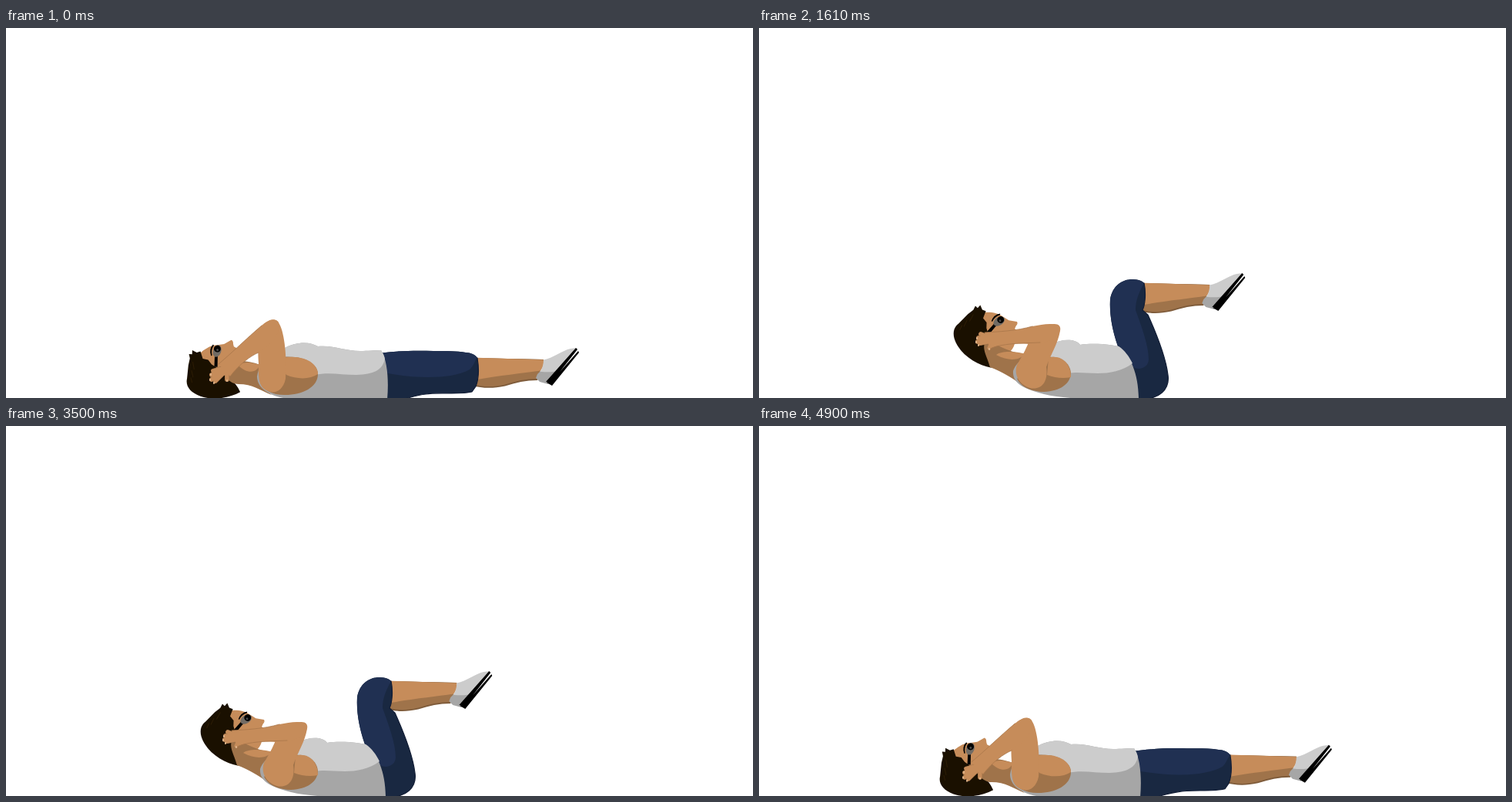
Animation, 970 px wide and 480 px high, one loop 4970 ms. Source, as an HTML page:

```html
<!DOCTYPE html>
<html lang="en">
<head>
<meta charset="utf-8">
<title>Crunch</title>
<style>
  html, body { margin: 0; width: 100%; height: 100%; overflow: hidden; background: #fff; }
  svg { display: block; width: 970px; height: 480px; }
</style>
</head>
<body>
<svg id="stage" viewBox="0 0 970 480">
  <g id="shin">
    <path fill="#7f5c3b" d="M604 428L698 430 690 457C675 457 662 460 648 464.500C630 468.500 617 467 606 464Z"/>
    <path fill="#9f734a" d="M604 428L698 430 690 455C675 455 662 458 648 462.500C630 467 617 465 606 462Z"/>
    <path fill="#c68c5a" d="M604 427.500L698 430.500C699 436 697 441 694 444.500C670 448 640 451 612 456L604 455Z"/>
    <path fill="#a6a6a6" d="M696 443L690 449 688 454 693 459 704 462 719 442Z"/>
    <path fill="#ccc" d="M698 430.500C711 428 723 418 733 416L741 415 716 445C708 447 700 446 694 446Q698 438 698 430.500Z"/>
    <path d="M740 415L742 417 708 460 701 459ZM743 419L744 421 709 464 702 460 712 454Z"/>
  </g>
  <g id="legs"></g>
  <g id="head">
    <path fill="#c68c5a" d="M338 345L354 331C362 335 370 342 372 349L376 357 384 364Q384 367 380 368L377 370 376 376 370 383Q364 390 357 392L344 388 328 374Z"/>
    <path fill="#1a1000" d="M324 397C312 386 302 368 302 350C302 336 308 327 318 326L335 322 344 321 349 318 350 322 355 320.500 354 327 357 331 349 337 350 344 346 350 344 357 338 364C338 374 336 386 324 397Z"/>
    <path fill="none" stroke="#2d1d05" d="M315 334L321 330M322 333L330 328M332 331L341 326"/>
    <path d="M356 346Q363 340 371 343.500L370 345Q363 343 357 347ZM344 354.500L359 350V354L345 358.500Z"/>
    <ellipse cx="364.500" cy="351.300" rx="8" ry="5.200" fill="#716b64"/>
    <ellipse cx="367.300" cy="350.600" rx="4.400" ry="4.500"/>
    <circle cx="366" cy="351.300" r="1.500" fill="#484848"/>
  </g>
  <g id="trunk"></g>
</svg>
<script>
const SKIN = '#c68c5a', SHADE = '#9f734a';
const STEP = 70, LOOP = 4970, PEAK = 34;
const HIP = { x: 503.7, y: 439.9, r: 109, rest: 6.3 };

// Progress keys: [step, value]. Thigh in degrees, trunk in pose units.
const THIGH = [[0, 0], [1, .6], [4, 4], [8, 13.9], [10, 22.7], [13, 44.9], [16, 64.2],
  [18, 73], [21, 86], [24, 93], [26, 94.8], [31, 95.4], [34, 95.4]];
const TRUNK = [[0, 0], [1, .01], [4, .1], [8, .36], [10, .56], [13, 1], [16, 1.35],
  [18, 1.6], [21, 2], [24, 2.2], [26, 2.4], [31, 3], [32, 3.06], [34, 3.1]];
const BEND = [0, 44.9, 86, 95.4];
const HEAD = [[274, 418.5, -71], [294, 395, -47], [312, 380, -32], [365, 351, 0]];

// Each shape is listed in four poses: lying, rising, half up, up.
const shortsTop = [
  'M485 422C505 419 530 418 555 419C570 419 585 419 597 421C603 421 610 424 612 428',
  'M484 423C505 398 520 380 536 362C545 353 553 350 560 350C566 351 570 352 571 355',
  'M466 413C458 390 455 370 456 352C459 334 472 326 485 326C493 326 499 329 500 331',
  'M457 414C445 395 438 378 438 360C438 342 450 330 466 330C474 330 480 333 482 335'];
const cuff = [
  'C614 440 614 455 610 465L605 472C590 476 560 472 545 475C535 476 525 479 515 482',
  'C576 368 575 380 572 391L571 399C553 418 541 440 533 462C527 476 516 481 505 481',
  'C503 345 501 360 498 366L505 372C514 392 528 425 531 450C534 470 518 481 500 481',
  'C485 350 483 364 480 370L487 375C500 392 520 420 527 445C532 468 512 481 490 481'];
const seat = ['L485 482Z', 'L485 481Z', 'L485 481Z', 'L470 481Z'];
const shortsLight = [
  'C608 432 608 438 602 443C590 450 570 453 548 453C525 453 505 450 485 446Z',
  'C571 372 566 385 558 394C545 408 528 424 518 433C510 440 500 442 488 443Z',
  'C494 342 489 352 489 366C497 388 506 412 506 430C506 440 494 445 486 440Z',
  'C474 345 470 358 470 372C484 388 496 410 496 428C496 440 486 444 474 438Z'];
const vestTop = [
  'M360 416C378 406 395 407 405 413C425 411 440 419 460 419C470 419 480 418 487 418',
  'M370 412C385 405 402 405 414 413C430 413 450 415 465 417C472 417 480 418 487 418',
  'M380 410C392 404 410 402 417 411C430 409 445 410 455 411C460 412 463 412 467 413',
  'M400 412C412 408 420 405 431 405C438 406 442 409 447 411C453 413 457 413 459 415'];
const vestBack = [
  'C496 432 497 460 495 482C440 482 400 482 360 480C340 476 326 466 326 452C330 430 345 420 360 416Z',
  'C496 432 497 460 494 482C440 482 400 483 366 479C345 474 329 466 329 450C332 432 350 420 370 412Z',
  'C483 425 493 450 493 482C440 482 400 482 370 475C345 468 329 462 330 445C335 430 355 420 380 410Z',
  'C476 425 488 450 488 482C455 481 415 478 388 469C360 458 345 442 341 427C345 412 370 410 400 412Z'];
const vestLight = [
  'C490 422 492 427 492 430C488 444 478 449 455 450C435 450 420 446 400 450L355 440Z',
  'C490 422 491 427 491 430C487 443 477 448 455 448C435 448 420 446 400 449L362 440Z',
  'C475 418 481 427 485 435C472 445 455 448 440 448C425 448 415 446 400 448L365 440Z',
  'C467 420 474 428 478 435C470 443 455 446 440 446C425 445 415 443 402 446L385 430Z'];
const neck = [
  'M285 435C300 430 315 432 330 437C330 450 330 462 345 476C330 470 320 462 302 462C290 462 280 450 285 435Z',
  'M285 425C300 418 312 428 338 430C340 440 335 455 345 472C330 468 318 458 297 456C285 445 280 435 285 425Z',
  'M295 405C310 410 320 420 346 423C340 430 335 440 340 462C325 452 318 447 300 440C296 425 288 415 295 405Z',
  'M328 368C345 380 355 392 362 403C355 412 345 415 342 428C336 415 333 405 324 396C327 385 327 375 328 368Z'];
const throat = [
  'M301 437C310 432 320 434 329 437C328 445 315 452 301 437Z',
  'M303 434C312 428 330 429 337 430C334 438 320 442 303 434Z',
  'M308 424C316 418 335 420 346 423C338 431 325 433 308 424Z',
  'M344 388C350 390 357 394 364 404C356 405 348 398 344 388Z'];
const shoulder = [
  'M350 428C385 422 405 435 405 449C405 466 385 476 362 476C345 476 335 470 330 460Z',
  'M372 428C390 425 405 435 405 448C403 466 385 475 362 475C348 474 338 468 333 458Z',
  'M376 427C392 425 405 435 405 449C403 464 388 472 366 472C350 470 340 465 335 455Z',
  'M395 425C405 427 407 437 407 444C405 455 393 460 378 460C362 455 350 448 347 440Z'];
const deltoid = [
  'M350 430C385 420 405 435 405 449C395 456 378 456 364 450Z',
  'M369 430C388 422 405 435 405 448C394 456 380 454 372 445Z',
  'M376 428C392 423 405 435 405 453C395 455 384 454 374 450Z',
  'M404 427C407 432 407 440 406 447C400 449 394 446 392 438Z'];
const upperArm = [
  'M335 384C343 377 351 376 355 384C362 396 365 430 363 455C360 470 350 474 343 472C330 468 327 460 328 435C327 420 327 410 330 400Z',
  'M360 384C370 381 378 382 377 390C379 405 373 420 370 440C371 462 358 474 347 471C333 468 329 455 334 440C338 425 345 415 352 404Z',
  'M375 386C385 382 393 384 391 393C388 410 378 425 373 440C376 460 366 470 352 467C336 462 331 448 335 437C342 425 346 418 350 408Z',
  'M415 374C432 375 440 381 438 387C432 402 415 417 402 428C395 442 375 450 360 447C345 440 344 428 347 417C358 411 372 407 392 396Z'];
const forearm = [
  'M276 436C295 420 312 403 332 386C339 380 349 375 354 382C357 400 342 412 328 421C318 425 303 436 291 452Z',
  'M284 413C300 409 325 401 350 389C362 383 375 380 377 387C377 402 362 408 345 412C325 416 308 424 294 430Z',
  'M293 395C310 394 335 393 355 387C370 384 388 381 391 390C389 404 375 409 352 410C330 409 315 409 300 416Z',
  'M340 358C355 362 370 367 385 368C405 371 432 372 438 384C436 394 420 396 404 395C385 391 365 384 345 380Z'];
const crease = [
  'M276 436C295 420 312 403 332 386M328 421C318 425 303 436 291 452',
  'M284 413C300 409 325 401 350 389M352 410C330 415 308 424 294 430',
  'M293 395C310 394 335 393 355 387M365 408C340 409 315 409 300 416',
  'M340 358C355 362 370 367 385 368M408 395C385 391 365 384 345 380'];
const fingers = [
  'M283 441L269 445M283 443L267 450M283 445L267 456M284 446L272 458M287 446L287 456',
  'M289 419L278 417M288 420L274 422M288 422L274 427M288 424L277 429M292 424L291 431',
  'M298 401L288 397M297 403L285 402M297 405L284 407M298 407L287 409M302 408L299 415',
  'M342 364L334 358M341 366L331 362M341 368L331 366M342 370L334 369M347 371L341 377'];
const nails = [
  'M266 449V450M265 456V457M270 460V461M287 457V458',
  'M272 422V423M272 428V429M276 431V432M291 432V433',
  'M283 402V403M282 407V408M285 411V412M299 416V417',
  'M329 362V363M329 367V368M332 370V371M340 378V379'];

const byId = id => document.getElementById(id);
const mix = (a, b, f) => a + (b - a) * f;
const NUM = /\d+/g;

function keyed(keys, k) {
  const i = Math.max(1, keys.findIndex(p => p[0] >= k));
  const [a, va] = keys[i - 1], [b, vb] = keys[i];
  return mix(va, vb, (k - a) / (b - a));
}

// Turns x, y pairs about the hip; a positive angle lifts the knee.
function turn(list, deg) {
  const r = deg * Math.PI / 180, c = Math.cos(r), s = Math.sin(r), out = [];
  for (let i = 0; i < list.length; i += 2) {
    const x = list[i] - HIP.x, y = list[i + 1] - HIP.y;
    out.push(HIP.x + x * c + y * s, HIP.y - x * s + y * c);
  }
  return out;
}

function blend(poses, u) {
  const i = Math.min(2, Math.floor(u));
  return poses[i].map((v, n) => mix(v, poses[i + 1][n], u - i));
}

const parts = [];
function part(layer, poses, paint) {
  const el = document.createElementNS('http://www.w3.org/2000/svg', 'path');
  for (const name in paint) el.setAttribute(name, paint[name]);
  byId(layer).append(el);
  const swings = layer === 'legs';
  const lists = poses.map((d, i) => {
    const list = d.match(NUM).map(Number);
    return swings ? turn(list, -BEND[i]) : list;
  });
  parts.push({ el, lists, swings, shape: poses[0] });
}
const join = (...sets) => sets[0].map((_, i) => sets.map(s => s[i]).join(''));
const line = (stroke, width) =>
  ({ fill: 'none', stroke, 'stroke-width': width, 'stroke-linecap': 'round' });
const cuffLine = cuff.map((d, i) => 'M' + shortsTop[i].match(NUM).slice(-2).join(' ') + d);

part('legs', join(shortsTop, cuff, seat), { fill: '#192841' });
part('legs', join(shortsTop, shortsLight), { fill: '#203052' });
part('legs', cuffLine, line('#111c34', 1.2));
part('trunk', neck, { fill: SHADE });
part('trunk', throat, { fill: SKIN });
part('trunk', join(vestTop, vestBack), { fill: '#a6a6a6' });
part('trunk', join(vestTop, vestLight), { fill: '#ccc' });
part('trunk', shoulder, { fill: SHADE });
part('trunk', deltoid, { fill: SKIN });
part('trunk', upperArm, { fill: SKIN });
part('trunk', fingers, line(SHADE, 6));
part('trunk', fingers, line(SKIN, 5));
part('trunk', forearm, { fill: SKIN });
part('trunk', crease, line('#a9774b', .8));
part('trunk', nails, line('#dfb58c', 2));

function pose(k) {
  const bend = keyed(THIGH, k), trunk = keyed(TRUNK, k);
  const seg = bend < BEND[1] ? 0 : bend < BEND[2] ? 1 : 2;
  const leg = seg + (bend - BEND[seg]) / (BEND[seg + 1] - BEND[seg]);

  for (const { el, lists, swings, shape } of parts) {
    let list = blend(lists, swings ? leg : trunk);
    if (swings) list = turn(list, bend);
    let n = 0;
    el.setAttribute('d', shape.replace(NUM, () => list[n++].toFixed(2)));
  }

  const a = (HIP.rest + bend) * Math.PI / 180;
  const x = HIP.x + HIP.r * Math.cos(a) - 612, y = HIP.y - HIP.r * Math.sin(a) - 428;
  byId('shin').setAttribute('transform', `translate(${x} ${y})`);

  const [hx, hy, tilt] = blend(HEAD, trunk);
  byId('head').setAttribute('transform', `translate(${hx} ${hy}) rotate(${tilt}) translate(-365 -351)`);
}

// Rest, rise, short hold at the top, and the same way back.
function stepAt(ms) {
  const n = Math.floor(ms % LOOP / STEP);
  return n < 37 ? Math.max(0, Math.min(PEAK, n - 2)) : Math.min(PEAK, 71 - n);
}

let shown = -1;
function tick() {
  const k = stepAt(performance.now() - start);
  if (k !== shown) pose(shown = k);
  requestAnimationFrame(tick);
}
const start = performance.now();
tick();
</script>
</body>
</html>
```
